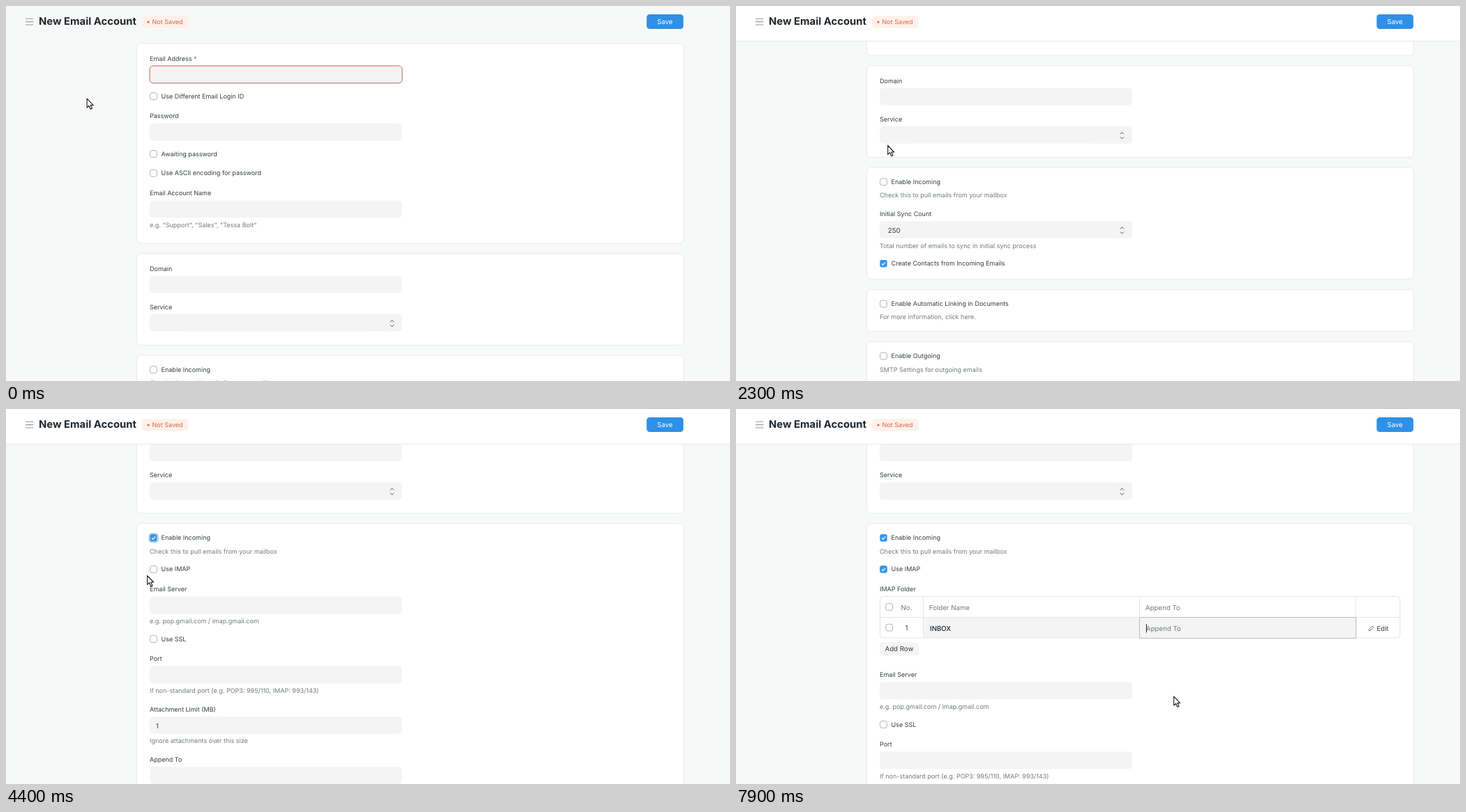
An HTML page that plays this animation: 1038 px wide and 539 px high, repeating every 8 s.

```html
<!DOCTYPE html>
<html lang="en">
<head>
<meta charset="utf-8">
<title>New Email Account</title>
<style>
  html, body { margin: 0; width: 100%; height: 100%; overflow: hidden; background: #f7f9f8; }
  svg { display: block; width: 1038px; height: 539px; }
  text { font: 9px Inter, sans-serif; fill: #363d42; text-rendering: geometricPrecision; white-space: pre; }
  .help { fill: #737a7e; }
  .big { font-size: 9.7px; }
  .bold { font-weight: 700; fill: #1f272e; }
  .mid { font-weight: 500; fill: #1f272e; }
  .title { font-size: 14.84px; }
  .center { text-anchor: middle; }
  .card { fill: #fefffe; stroke: #e8ebe9; }
  .input { fill: #f3f4f3; }
  .required { fill: #f3f4f3; stroke: #c75f69; }
  .line { fill: none; stroke: #e4e7e5; }
  .icon { fill: none; stroke: #4a5156; stroke-linecap: round; stroke-linejoin: round; }
</style>
</head>
<body>
<svg id="stage" viewBox="0 0 1038 539"></svg>
<script>
const LOOP = 8000, STEP = 100, LEFT = 206, TABLE_HEIGHT = 123;

// Markup helpers; y is the vertical middle of a line of text
const text = (x, y, s, cls = '', style = '') => {
  const drop = cls.includes('title') ? 5.3 : cls.includes('big') ? 3.4 : 3;
  return `<text x="${x}" y="${y + drop}" class="${cls}" style="${style}">${s}</text>`;
};
const rect = (x, y, w, h, r, more) =>
  `<rect x="${x}" y="${y}" width="${w}" height="${h}" rx="${r}" ${more}/>`;
const square = (x, y, size, more) => rect(x - size / 2, y - size / 2, size, size, size / 3.7, more);
const group = (id, body, y = 0) => `<g id="${id}" transform="translate(0 ${y})">${body}</g>`;

const emptyBox = (x, y) => square(x, y, 9.8, 'fill="#fefffe" stroke="#9ca3a6" stroke-width=".8"');
const fullBox = (x, y) =>
  square(x, y, 10.4, 'fill="#3595e8"') +
  `<path d="M${x - 2.6} ${y + .2}l1.8 1.8l3.5-3.8" fill="none" stroke="#fff" stroke-width="1.2"/>`;
const ring = (id, y) =>
  square(LEFT + 5.5, y, 12.4, `id="${id}" fill="none" stroke="#b4cde2" stroke-width="1.7"`);
const spinner = y =>
  `<path class="icon" d="M551.2 ${y - 2.3}l2.3-2.3l2.3 2.3m0 4.8l-2.3 2.3l-2.3-2.3"/>`;

// Form parts flow down the page; each one moves flow to the next slot
const FIELD = 55, CHECK = 27.8, FIELD_TAIL = .8, CHECK_TAIL = -5.4;
let flow = 54;

function check(label, on) {
  const y = flow;
  flow += CHECK;
  return (on ? fullBox : emptyBox)(LEFT + 5.5, y) + text(LEFT + 16.6, y, label);
}
function field(label, inner = () => '', cls = 'input') {
  const y = flow + .9;
  flow += FIELD;
  return text(LEFT, y, label) + rect(LEFT, y + 10.4, 362, 24.8, 5, `class="${cls}"`) + inner(y + 23.6);
}
function help(...lines) {
  const y = flow - 8.4;
  flow += 17.3;
  return lines.map((s, i) => text(LEFT, y + i * 14.6, s, 'help')).join('');
}
function card(body, tail) {
  const top = flow;
  flow += 20.7;
  const inner = body(), bottom = flow + tail;
  flow = bottom + 14.7;
  return rect(187.5, top, 784, bottom - top, 6, 'class="card"') + inner;
}

const topCards =
  card(() =>
    field('Email Address <tspan fill="#d9534f">*</tspan>', undefined, 'required') +
    check('Use Different Email Login ID') +
    field('Password') +
    check('Awaiting password') +
    check('Use ASCII encoding for password') +
    field('Email Account Name') +
    help('e.g. "Support", "Sales", "Tessa Bolt"'), FIELD_TAIL) +
  card(() => field('Domain') + field('Service', spinner), FIELD_TAIL);

const incomingTop = flow;

const closedCards =
  card(() =>
    check('Enable Incoming') +
    help('Check this to pull emails from your mailbox') +
    field('Initial Sync Count', y => text(217.8, y, '250', 'big') + spinner(y)) +
    help('Total number of emails to sync in initial sync process') +
    check('Create Contacts from Incoming Emails', true), CHECK_TAIL) +
  card(() =>
    check('Enable Automatic Linking in Documents') +
    help('For more information, click here.'), CHECK_TAIL) +
  card(() =>
    check('Enable Outgoing') +
    help('SMTP Settings for outgoing emails') +
    check('Send unsubscribe message in email', true) +
    check('Track Email Status', true) +
    help('Track if your email has been opened by the recipient.',
      "Note: If you're sending to multiple recipients, even if 1 recipient reads the email, it'll"),
    CHECK_TAIL);

// Drawn relative to the slot below the "Use IMAP" box
const ROW1 = 27.2, ROW2 = 56.4;
const table =
  fullBox(LEFT + 5.5, -CHECK) + ring('imapRing', -CHECK) +
  text(LEFT, .9, 'IMAP Folder') +
  group('editing',
    rect(268.5, 41.3, 620, 29.5, 0, 'class="input"') +
    text(278, ROW2 + .6, 'INBOX', 'big mid') + text(588, ROW2 + .6, 'Append To', 'big help')) +
  group('resting', text(276.8, ROW2, 'INBOX', 'bold')) +
  rect(206.5, 11.3, 745.5, 59.5, 4, 'class="line"') +
  '<path class="line" d="M206.5 41.3H952M268.5 11.3v59.5m310 0v-59.5m310 0v59.5"/>' +
  emptyBox(219.7, ROW1 - .9) + emptyBox(219.7, ROW2 - .4) +
  text(244.5, ROW1, 'No.', 'big help center') + text(244.5, ROW2, '1', 'big center') +
  text(276.8, ROW1, 'Folder Name', 'big help') + text(587, ROW1, 'Append To', 'big help') +
  '<path class="icon" stroke-width=".8" d="M907.5 60.3l.6-2.4l4.2-4.2l1.8 1.8l-4.2 4.2z"/>' +
  text(918.5, ROW2 + .7, 'Edit', 'big') +
  rect(LEFT, 77.4, 56.3, 18.6, 4, 'class="input"') + text(213.5, 86.8, 'Add Row', 'big') +
  group('focus',
    rect(578.5, 41.3, 310.5, 30.2, 1, 'fill="none" stroke="#b9bebb"') +
    '<path d="M588.5 50.8v12.5" stroke="#222"/>');

flow = incomingTop;
const openCard = card(() =>
  check('Enable Incoming', true) + ring('incomingRing', flow - CHECK) +
  help('Check this to pull emails from your mailbox') +
  check('Use IMAP') +
  group('table', table, flow) +
  group('server',
    field('Email Server') +
    help('e.g. pop.gmail.com / imap.gmail.com') +
    check('Use SSL') +
    field('Port') +
    help('If non-standard port (e.g. POP3: 995/110, IMAP: 993/143)') +
    field('Attachment Limit (MB)', y => text(214.9, y, '1', 'big')) +
    help('Ignore attachments over this size') +
    field('Append To')), FIELD_TAIL);

const header =
  '<path id="bar" fill="#fefffe" stroke="#e6e9e7" d="M-1-1H1039V50.5H-1z"/>' +
  '<path stroke="#949a9c" stroke-width="1.1" d="M28 18.2h11.3m0 4.4h-11.3m0 4.4h11.3"/>' +
  text(47, 22, 'New Email Account', 'bold title') +
  rect(195.3, 14, 66.5, 17.4, 4.5, 'fill="#fdf1ea"') +
  '<circle cx="204" cy="23" r="1.6" fill="#dc6a42"/>' +
  text(209.6, 23, 'Not Saved', '', 'fill:#d9673f') +
  rect(918.5, 12, 52.7, 21, 4.5, 'fill="#2e90e6"') +
  text(944.8, 22.8, 'Save', 'big center', 'fill:#fff');

// Pointer shapes, hot spot at the origin
const pointers =
  '<g id="pointer" stroke="#1c1c1c" stroke-width="1.1" stroke-linejoin="round" fill="#fff">' +
  '<path id="arrow" d="M.3.3V13.2L3.2 10.5L5.4 15.5L7.6 14.5L5.4 9.8H9.3Z"/>' +
  '<g id="beam" fill="none"><path stroke="#fff" stroke-width="3" d="M0-6V6"/>' +
  '<path stroke-width="1.4" d="M-2.7-6H2.7M0-6V6M-2.7 6H2.7"/></g>' +
  '<path id="hand" d="M-1 1.5Q0 .2 1 1.5V5.2L6 6Q7.4 6.4 7.2 8L6.3 13H-.8L-3.5 9.3Q-3.4 7.7-1 8.8Z"/>' +
  '</g>';

const $ = id => document.getElementById(id);
$('stage').innerHTML =
  group('page', topCards + group('closed', closedCards) + group('open', openCard)) +
  header + pointers;

// Pointer moves: start, duration, x, y; it rests in between
const moves = [
  [0, 1, 115.8, 132.8], [700, 200, 129, 128.5], [1000, 300, 183.4, 131.5],
  [2000, 300, 217.4, 200.2], [2400, 300, 220.3, 211], [2800, 500, 212.4, 187],
  [3600, 400, 206, 248.5], [4000, 200, 193.6, 243], [4200, 200, 202.3, 239.2],
  [4500, 100, 206.8, 235.2], [4700, 400, 217, 229], [5300, 300, 233.5, 257],
  [5700, 500, 640, 322.3], [6300, 300, 650.5, 312], [7100, 500, 627.4, 412.8]
];

const progress = (t, start, span) => Math.min(1, Math.max(0, (t - start) / span));
const ease = f => f < .5 ? 4 * f ** 3 : 1 - 4 * (1 - f) ** 3;
const scrollAt = t => 270 * ease(progress(t, 1600, 480)) + 67.5 * ease(progress(t, 2400, 300));

function pointerAt(t) {
  let [, , x, y] = moves[0];
  for (const [start, span, toX, toY] of moves) {
    const f = progress(t, start, span);
    x += (toX - x) * f;
    y += (toY - y) * f;
  }
  return [x, y];
}

const show = (id, on) => { $(id).style.display = on ? '' : 'none'; };
const move = (id, x, y) => $(id).setAttribute('transform', `translate(${x} ${y})`);

function draw(t) {
  const scroll = scrollAt(t);
  move('page', 0, -scroll);
  show('bar', scroll > 0);

  const opened = t >= 3500, imap = t >= 4800, editing = t >= 6900;
  show('closed', !opened);
  show('open', opened);
  show('incomingRing', !imap);
  show('table', imap);
  move('server', 0, imap ? TABLE_HEIGHT : 0);
  show('imapRing', t < 6600);
  show('editing', editing);
  show('resting', !editing);
  show('focus', t >= 7200);

  const beam = t >= 2600 && t < 2900 || t >= 6900 && t < 7200;
  const hand = t >= 6100 && t < 6900;
  show('beam', beam);
  show('hand', hand);
  show('arrow', !beam && !hand);
  move('pointer', ...pointerAt(t));
}

const start = performance.now();
function tick() {
  const t = (performance.now() - start) % LOOP;
  draw(Math.floor(t / STEP) * STEP);
  requestAnimationFrame(tick);
}
tick();
</script>
</body>
</html>
```
